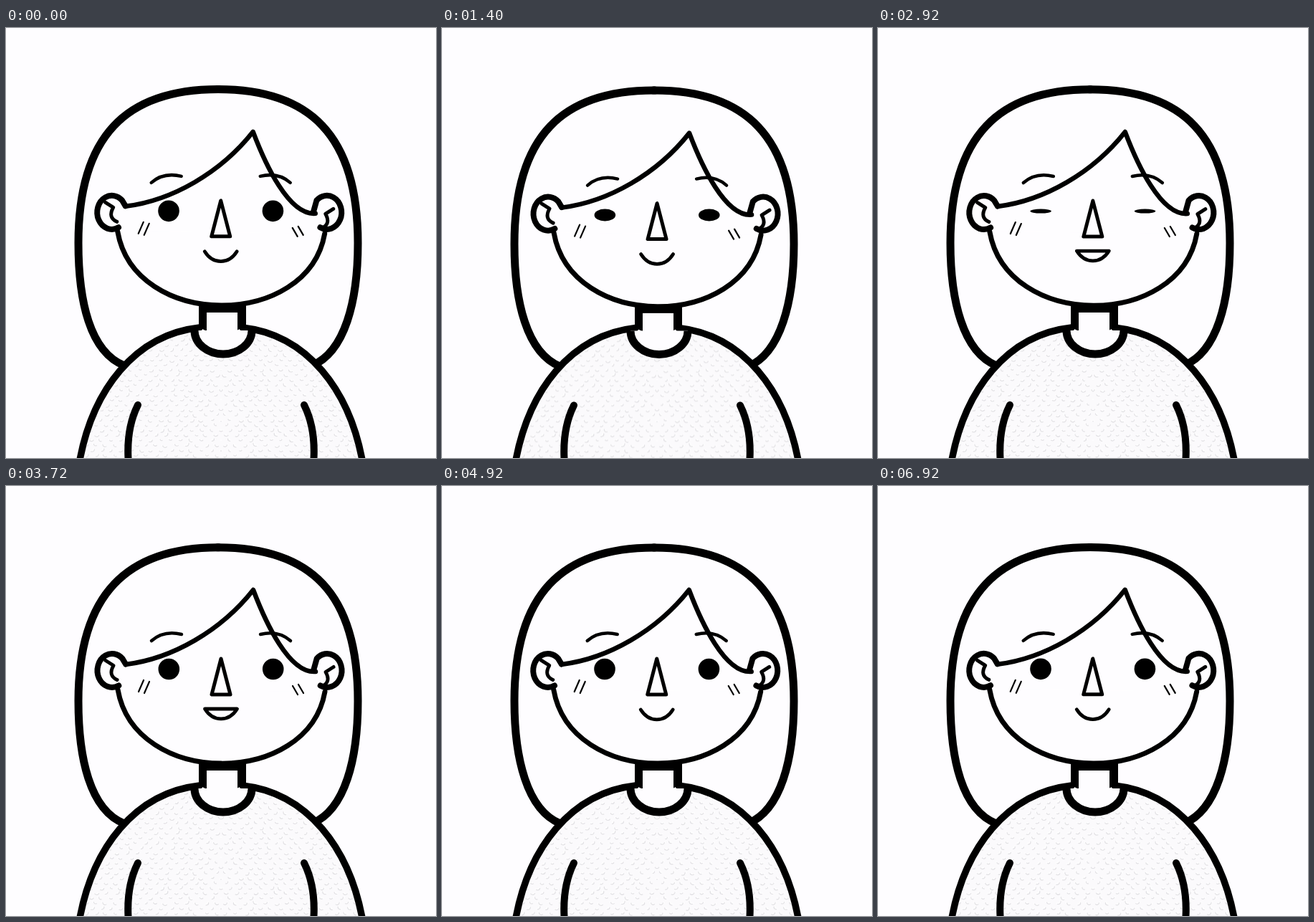
Write an HTML page with a canvas that moves like this. It is 600x600 px and loops after 7 s.

```html
<!DOCTYPE html>
<html lang="en">
<head>
<meta charset="utf-8">
<title>Portrait</title>
<style>
html, body { margin: 0; width: 100%; height: 100%; overflow: hidden; background: #fefdff; }
canvas { display: block; width: 600px; height: 600px; }
</style>
</head>
<body>
<canvas id="stage" width="600" height="600"></canvas>
<script>
const ctx = document.getElementById('stage').getContext('2d');
const LOOP = 7000, TICK = 40, BOIL = 200;
const PAPER = '#fefdff', INK = '#000';
const BLINKS = [40, 1400, 2880];
const NODS = [1280, 3960], NOD_TIME = 640;
const FACE = 'M156 284 C180 421 421 421 445 287';

const clamp = v => Math.max(0, Math.min(1, v));
const ease = v => (1 - Math.cos(Math.PI * clamp(v))) / 2;

function rng(seed) {
  let s = seed * 2654435761 >>> 0;
  return () => {
    s = s + 0x6D2B79F5 >>> 0;
    let r = Math.imul(s ^ s >>> 15, s | 1);
    r ^= r + Math.imul(r ^ r >>> 7, r | 61);
    return ((r ^ r >>> 14) >>> 0) / 4294967296;
  };
}

function stroke(width, path) {
  ctx.lineWidth = width;
  ctx.stroke(new Path2D(path));
}

function fill(color, path) {
  ctx.fillStyle = color;
  ctx.fill(new Path2D(path));
}

function shifted(dx, dy, draw) {
  ctx.save();
  ctx.translate(dx, dy);
  draw();
  ctx.restore();
}

// Draws once as given and once flipped about a vertical axis.
function mirrored(axis, draw) {
  shifted(0, 0, () => draw(1));
  shifted(2 * axis, 0, () => {
    ctx.scale(-1, 1);
    draw(-1);
  });
}

// Embossed knit, drawn once.
const knit = document.createElement('canvas');
knit.width = knit.height = 600;
(() => {
  const k = knit.getContext('2d'), rnd = rng(7);
  k.fillStyle = '#fbfafc';
  k.fillRect(0, 0, 600, 600);
  k.lineWidth = 1.2;
  for (let row = 0, y = 412; y < 606; y += 7, row++) {
    for (let x = 96 + row % 2 * 7; x < 306; x += 14) {
      const px = x + rnd() * 3, py = y + rnd() * 2;
      const r = 2 + rnd() * 1.6, a = rnd() * 1.6 - 0.4;
      for (const [color, off] of [['#fff', -1.2], ['#e2e1e4', 0]]) {
        k.strokeStyle = color;
        k.beginPath();
        k.arc(px + off, py + off, r, a, a + 2.2);
        k.stroke();
      }
    }
  }
})();

function nod(t, peak, depth) {
  const start = NODS.find(s => t > s && t < s + NOD_TIME);
  if (start === undefined) return 0;
  const u = t - start;
  return depth * (u < peak ? ease(u / peak) : ease((NOD_TIME - u) / (NOD_TIME - peak)));
}

function eyeHeight(t) {
  const start = BLINKS.find(s => t >= s && t < s + 120);
  if (start === undefined) return 14.8;
  return t < start + 40 ? 8.5 : 3;
}

function drawHair(rnd) {
  const top = 86 + rnd() - 0.5;
  const wob = v => v + (rnd() - 0.5) * 3;
  mirrored(296, () => stroke(11, `M297 ${top} L296 ${top} C${wob(168)} ${top} 101 ${wob(150)} 101 300
    C101 ${wob(380)} ${wob(118)} 452 165 471`));
}

function drawNeck(dy) {
  ctx.fillStyle = INK;
  ctx.fillRect(269, 384 + dy, 66, 39 - dy);
  ctx.fillStyle = PAPER;
  ctx.fillRect(280, 397 + dy, 43, 40);
}

function drawBody() {
  const shoulder = 'M102 608 C120 505 180 428 270 418';
  mirrored(300, () => {
    ctx.save();
    ctx.clip(new Path2D(shoulder + ' L280 423 H300 V608 Z'));
    ctx.drawImage(knit, 0, 0);
    ctx.restore();
    stroke(9.5, shoulder);
    stroke(10, 'M184 526 Q167 560 171 608');
  });
  ctx.lineWidth = 11;
  ctx.lineCap = 'butt';
  ctx.fillStyle = PAPER;
  ctx.beginPath();
  ctx.ellipse(303, 422, 40, 33, 0, Math.PI, 0, true);
  ctx.fill();
  ctx.stroke();
  ctx.lineCap = 'round';
}

function drawEar(side) {
  const drop = side < 0 ? 9 : 0;
  shifted(148, 257.5, () => {
    ctx.lineWidth = 8;
    ctx.beginPath();
    ctx.ellipse(0, 0, 20.5, 23.5, 0, 1.1, -0.8);
    ctx.lineTo(19, drop - 9);
    ctx.stroke();
    stroke(5, `M-9 ${drop - 14} L2 ${drop - 7} Q-6 ${drop + 7} 7 ${drop + 13}`);
  });
}

function drawHead() {
  fill(PAPER, FACE);
  stroke(7, FACE);
  mirrored(298, drawEar);
  stroke(6.5, 'M167 249 C232 241 300 202 345 145 C362 190 395 262 432 259');
}

function drawMouth(open) {
  const y = 312 - open, low = y + 18.5, high = y + 18 * (1 - open) ** 2;
  const smile = `M277.5 ${y} C289 ${low} 311 ${low} 322.5 ${y}`;
  const lips = open > 0 ? `${smile} C311 ${high} 289 ${high} 277.5 ${y} Z` : smile;
  if (open > 0) fill(PAPER, lips);
  stroke(4.8, lips);
}

function drawFeatures(t) {
  const h = eyeHeight(t), drop = h > 5 && h < 10 ? 2 : 0;
  mirrored(300, side => {
    stroke(4.5, 'M203 216 Q220 201 245 207');
    const [y, len] = side > 0 ? [271, 16] : [277, 12];
    stroke(2.2, `M192 ${y} l-7 ${len} M200 ${y + 2} l-7 ${len}`);
    ctx.fillStyle = INK;
    ctx.beginPath();
    ctx.ellipse(227.3, 255.5 + drop, 14.8, h, 0, 0, Math.PI * 2);
    ctx.fill();
  });
  stroke(5, 'M300 241 L287 291 H313 Z');
  drawMouth(ease((t - 1680) / 480) - ease((t - 3960) / 480));
}

function draw(time) {
  const t = Math.floor(time % LOOP / TICK) * TICK;
  const step = Math.floor((t + LOOP - 120) % LOOP / BOIL);
  const rnd = rng(step + 11);
  const head = nod(t, 240, 3.6), face = nod(t, 160, 4.4);
  ctx.fillStyle = PAPER;
  ctx.fillRect(0, 0, 600, 600);
  ctx.strokeStyle = INK;
  ctx.lineCap = ctx.lineJoin = 'round';
  shifted(0, head * 0.8, () => drawHair(rnd));
  drawNeck(head * 0.5);
  shifted(0, head * 0.25, drawBody);
  const jx = (rnd() - 0.5) * 0.6, jy = (rnd() - 0.5) * 0.4;
  shifted(jx, head + jy, drawHead);
  shifted(jx, face + jy, () => drawFeatures(t));
}

const begin = performance.now();
function loop() {
  draw(performance.now() - begin);
  requestAnimationFrame(loop);
}
loop();
</script>
</body>
</html>
```
